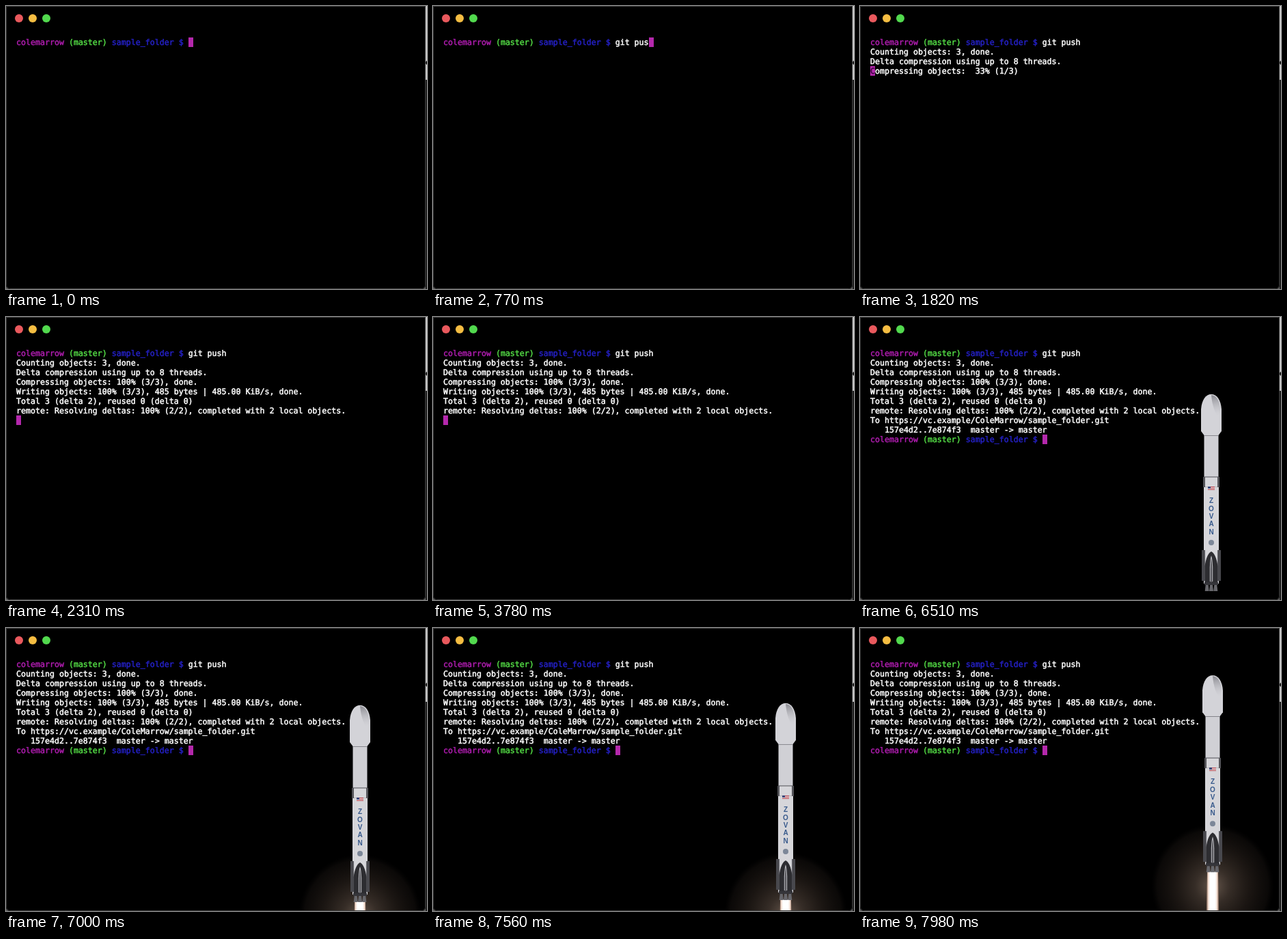
These frames come from a looping animation (616x414 px, 8000 ms). An HTML page with a canvas:

```html
<!DOCTYPE html>
<html lang="en">
<head>
<meta charset="utf-8">
<title>Terminal launch</title>
<style>
html, body { margin: 0; width: 616px; height: 414px; overflow: hidden; background: #000; }
canvas { position: absolute; left: 0; top: 0; display: block; }
pre {
  position: absolute; left: 15px; top: 46px; margin: 0;
  font: 11.627px/14px "DejaVu Sans Mono", "Liberation Mono", monospace;
  color: #fff; -webkit-text-stroke: .5px currentColor;
  text-rendering: geometricPrecision;
}
.user { color: #ac1cac; }
.branch { color: #52d844; }
.path { color: #2420c4; }
.under { color: #3c0440; }
</style>
</head>
<body>
<canvas id="stage" width="616" height="414"></canvas>
<pre id="term"></pre>
<script>
const W = 616, H = 414, LOOP = 8000, STEP = 70;
const ctx = document.getElementById('stage').getContext('2d');
const term = document.getElementById('term');

const span = (cls, text) => `<span class="${cls}">${text}</span>`;
const PROMPT = span('user', 'colemarrow') + ' ' + span('branch', '(master)') + ' ' +
  span('path', 'sample_folder $') + ' ';
const PROMPT_LEN = 36;
const COMMAND = 'git push';
const KEYS = [140, 350, 420, 560, 630, 700, 770, 910];
const ENTER = 1120, COUNT = 1820, WRITE = 1890, REMOTE = 2170, DONE = 6440;
const ROCKET = 6510, IGNITE = 6790, LIFT = 7410, STEADY = 7560;

// Terminal rows and cursor cell at time t
function screen(t) {
  const typed = KEYS.filter(k => t >= k).length;
  const rows = [PROMPT + COMMAND.slice(0, typed)];
  if (t < ENTER) return { rows, row: 0, col: PROMPT_LEN + typed };
  if (t >= COUNT) {
    rows.push('Counting objects: 3, done.', 'Delta compression using up to 8 threads.');
    if (t < WRITE) {
      rows.push(span('under', 'C') + 'ompressing objects:  33% (1/3)');
      return { rows, row: 3, col: 0 };
    }
    rows.push('Compressing objects: 100% (3/3), done.',
      'Writing objects: 100% (3/3), 485 bytes | 485.00 KiB/s, done.',
      'Total 3 (delta 2), reused 0 (delta 0)');
  }
  if (t >= REMOTE)
    rows.push('remote: Resolving deltas: 100% (2/2), completed with 2 local objects.');
  if (t >= DONE) {
    rows.push('To https://vc.example/ColeMarrow/sample_folder.git',
      '   157e4d2..7e874f3  master -&gt; master', PROMPT);
    return { rows, row: 9, col: PROMPT_LEN };
  }
  return { rows, row: rows.length, col: 0 };
}

function rect(color, x, y, w, h) {
  ctx.fillStyle = color;
  ctx.fillRect(x, y, w, h);
}

function disc(color, x, y, r) {
  ctx.fillStyle = color;
  ctx.beginPath();
  ctx.arc(x, y, r, 0, Math.PI * 2);
  ctx.fill();
}

function gradient(g, ...stops) {
  stops.forEach(([at, color]) => g.addColorStop(at, color));
  return g;
}

// Pointed arch, tip at top, flat base
function arch(color, half, top, base) {
  const mid = top + (base - top) * .45;
  ctx.fillStyle = color;
  ctx.beginPath();
  ctx.moveTo(-half, base);
  ctx.lineTo(-half, mid);
  ctx.quadraticCurveTo(-half * .75, top + 4, 0, top);
  ctx.quadraticCurveTo(half * .75, top + 4, half, mid);
  ctx.lineTo(half, base);
  ctx.fill();
}

function fairing() {
  ctx.beginPath();
  ctx.moveTo(-10.5, 60);
  ctx.lineTo(-15, 54);
  ctx.lineTo(-15, 22);
  ctx.bezierCurveTo(-14, 8, -8, 0, 0, 0);
  ctx.bezierCurveTo(8, 0, 14, 8, 15, 22);
  ctx.lineTo(15, 54);
  ctx.lineTo(10.5, 60);
  ctx.closePath();
  ctx.fillStyle = '#d3d3d8';
  ctx.fill();
  const shade = gradient(ctx.createLinearGradient(0, 0, 4, 32),
    [0, 'rgba(105,105,112,.75)'], [1, 'rgba(190,190,196,0)']);
  ctx.fillStyle = shade;
  ctx.beginPath();
  ctx.moveTo(0, 1);
  ctx.bezierCurveTo(8, 2, 13, 10, 13, 24);
  ctx.lineTo(11, 34);
  ctx.quadraticCurveTo(2, 24, 0, 1);
  ctx.fill();
}

function flag() {
  for (let i = 0; i < 5; i++) rect(i % 2 ? '#eee4e4' : '#b8424c', -5, 135 + i, 10, 1);
  rect('#3d4a7c', -5, 135, 4, 3);
}

function lettering() {
  ctx.fillStyle = '#385a8c';
  ctx.font = 'bold 10px "Liberation Sans", Arial, sans-serif';
  ctx.textAlign = 'center';
  ctx.textBaseline = 'middle';
  [...'ZOVAN'].forEach((c, i) => ctx.fillText(c, 0, 156.5 + i * 11.4));
  disc('#7c8798', 0, 217, 4);
}

function glow(power) {
  const g = gradient(ctx.createRadialGradient(0, 308, 4, 0, 308, 90),
    [0, 'rgba(150,128,112,.62)'], [.25, 'rgba(108,90,78,.5)'],
    [.6, 'rgba(66,53,45,.4)'], [.9, 'rgba(36,29,25,.3)'], [1, 'rgba(20,16,14,0)']);
  ctx.globalAlpha = power;
  ctx.fillStyle = g;
  ctx.fillRect(-90, 218, 180, 180);
  ctx.globalAlpha = 1;
}

function flame() {
  const g = gradient(ctx.createLinearGradient(-9.5, 0, 9.5, 0),
    [0, 'rgba(200,150,125,.35)'], [.16, '#f3ddd0'], [.3, '#fff'],
    [.7, '#fff'], [.84, '#f3ddd0'], [1, 'rgba(200,150,125,.35)']);
  ctx.fillStyle = g;
  ctx.beginPath();
  ctx.moveTo(-8, 287);
  ctx.lineTo(8, 287);
  ctx.lineTo(9.5, 360);
  ctx.lineTo(-9.5, 360);
  ctx.fill();
}

function rocket(t) {
  const lit = t >= IGNITE;
  const beat = Math.floor((t - IGNITE) / STEP);
  let x = 514;
  if (lit) x = 516 + (t < STEADY ? [2, -2, 0][beat % 3] : 0);
  const rise = Math.max(0, t - LIFT) / 1000;
  ctx.save();
  ctx.translate(x, 113 - 135 * rise * rise);
  if (lit) {
    glow(Math.min(1, (t - IGNITE + STEP) / 210));
    flame();
  }
  fairing();
  rect('#d0d0d5', -10.5, 60, 21, 62);
  rect('#77777d', -10.5, 60, 21, .8);
  rect('#d6d6da', -11, 121, 22, 156);
  rect('#505056', -11, 120.5, 22, 1);
  rect('#a0a0a6', -9, 135, 18, .6);
  for (const side of [-1, 1]) {
    rect('#55555a', side * 10.5 - 1.5, 121, 3, 15);
    rect('#48484d', side * 11.5 - 2.5, 228, 5, 45);
    rect('#77777d', side * 9.3 - .4, 228, .8, 45);
  }
  arch('#2d2d31', 9.5, 230, 278);
  arch('#b9b9be', 2.2, 236, 274);
  arch('#55555a', 1.2, 240, 275);
  rect('#35353a', -10, 275, 20, 4);
  for (const n of [-6.3, 0, 6.3]) {
    ctx.fillStyle = '#67676c';
    ctx.beginPath();
    ctx.moveTo(n - 2, 279);
    ctx.lineTo(n + 2, 279);
    ctx.lineTo(n + 3, 288);
    ctx.lineTo(n - 3, 288);
    ctx.fill();
  }
  flag();
  lettering();
  ctx.restore();
}

function backdrop() {
  rect('#666', 0, 0, W, H);
  ctx.fillStyle = '#000';
  ctx.beginPath();
  ctx.roundRect(0, 0, 614, H, [0, 0, 5, 5]);
  ctx.fill();
  disc('#e9595d', 19, 18, 6);
  disc('#f5bd42', 39, 18, 6);
  disc('#52d94e', 59, 18, 6);
}

function edges() {
  rect('#202020', 614, 108, 2, 306);
  rect('#c8c8c8', 614, 0, 2, 108);
  disc('#111', 617, 83, 3);
  ctx.strokeStyle = '#3c3c3c';
  ctx.lineWidth = 1;
  ctx.beginPath();
  ctx.roundRect(.5, .5, 613, 413, [0, 0, 5, 5]);
  ctx.stroke();
}

let shown = '';
function draw(now) {
  const t = Math.floor((now % LOOP) / STEP) * STEP;
  const { rows, row, col } = screen(t);
  const html = rows.join('\n');
  if (html !== shown) term.innerHTML = shown = html;
  backdrop();
  if (t >= ROCKET) rocket(t);
  edges();
  rect('#b428ac', 15 + col * 7, 46 + row * 14, 7, 14);
  requestAnimationFrame(() => draw(performance.now() - start));
}

const start = performance.now();
draw(0);
</script>
</body>
</html>
```
